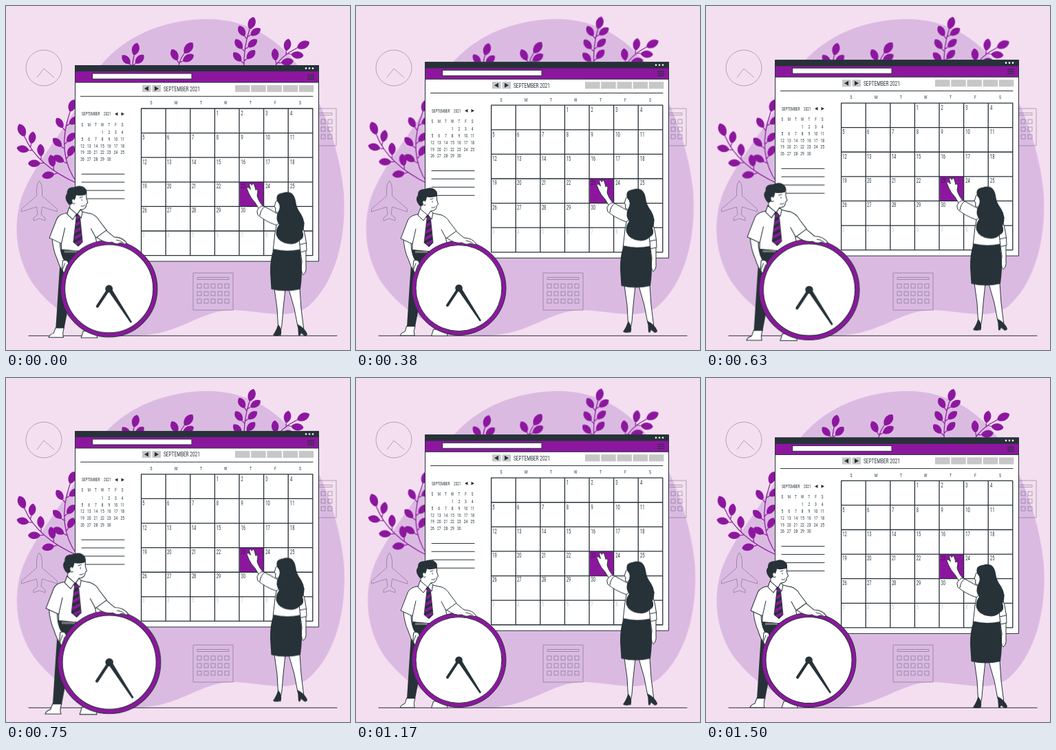
Write an HTML page that moves like this. It is 500 by 500 pixels and loops after 1.54 s.

```html
<!DOCTYPE html>
<html lang="en">
<head>
<meta charset="utf-8">
<title>Calendar planning</title>
<style>
html, body { margin: 0; width: 100%; height: 100%; overflow: hidden; background: #f4dff1; }
svg { display: block; width: 100vw; height: 100vh; }
text { font-family: Roboto, "Liberation Sans", sans-serif; fill: #263238; }
.ink { fill: #263238; }
.violet { fill: #8c179e; }
.line { fill: none; stroke: #263238; stroke-linecap: round; stroke-linejoin: round; }
.skin { fill: #fff; stroke: #263238; stroke-width: 1; stroke-linejoin: round; stroke-linecap: round; }
.faint { fill: none; stroke: #263238; stroke-width: .9; opacity: .38; }
.stem { fill: none; stroke: #8c179e; stroke-width: 1.2; }
.float { animation: float 1.54s linear infinite; }
.beat { transform-origin: 143px 374px; animation: beat 1.54s ease -.04s infinite; }
.sway { animation: sway .77s ease-in-out infinite; }
.drift { animation: drift 1.54s ease-in-out infinite; }
@keyframes float {
  0%, 100% { transform: translateY(-.4px); }
  48% { transform: translateY(-9.7px); }
  98% { transform: translateY(0); }
}
@keyframes beat {
  0%, 27.3%, 37.7%, 64.9%, 100% { transform: scale(1); }
  13.6%, 51.3% { transform: scale(1.09); }
}
@keyframes sway {
  0%, 100% { transform: rotate(0deg); }
  50% { transform: rotate(var(--a)); }
}
@keyframes drift {
  0%, 100% { transform: translateX(0); }
  25% { transform: translateX(-.8px); }
  75% { transform: translateX(1.6px); }
}
</style>
</head>
<body>
<svg viewBox="0 0 500 500">
  <defs>
    <path id="leaf" d="M0 0C.25-.38.8-.38 1 0C.8.38.25.38 0 0Z"/>
    <pattern id="stripes" width="8" height="8" patternUnits="userSpaceOnUse" patternTransform="rotate(-28)">
      <path class="ink" d="M0 0H8V8H0Z"/><path class="violet" d="M0 0H8V4H0Z"/>
    </pattern>
    <g id="planner" class="faint">
      <path d="M272 388H330V442H272ZM278 394.500H324V397.500H278Z"/>
      <g id="boxes"></g>
    </g>
  </defs>

  <path class="drift" fill="#dbbae2" d="M290 19C350 18 400 48 432 98C464 148 486 215 491 272C495 340 478 402 440 436C412 458 375 443 330 442C280 442 255 478 190 479C125 481 68 445 38 402C14 365 10 318 22 280C40 228 88 180 110 132C140 62 205 21 290 19Z"/>

  <g class="faint">
    <circle cx="55" cy="90" r="26"/>
    <path d="M45 104L55 91L70 104"/>
    <path d="M48.500 254Q52.500 258 52.500 266V276L74.500 295V299L52.500 292L51 303L57 308V312L48.500 309L40 312V308L46 303L44.500 292L22.500 299V295L44.500 276V266Q44.500 258 48.500 254Z"/>
  </g>
  <use href="#planner"/>
  <use href="#planner" x="150" y="-239"/>

  <g id="plants"></g>
  <path class="line" d="M33 479.300H481"/>

  <g class="float">
    <path fill="#fff" stroke="#263238" d="M100.500 87H454.500V371.500H100.500Z"/>
    <path class="violet" stroke="#263238" d="M100.500 95H454.500V111.500H100.500Z"/>
    <path class="ink" d="M100 86.500H455V95.500H100Z"/>
    <g fill="#fff"><circle cx="436" cy="91" r="1.300"/><circle cx="441" cy="91" r="1.300"/><circle cx="446" cy="91" r="1.300"/></g>
    <path class="skin" d="M126 98.500H270V106.500H126Z"/>
    <path class="line" stroke-width="1.200" d="M438.500 100.500H447.500M438.500 103.500H447.500M438.500 106.500H447.500"/>
    <path class="line" d="M108.500 131.700H446M110 244.700H172M110 256.500H172M110 268.500H172M110 280.500H172"/>
    <path fill="#c7c7c7" d="M198 115.500H210.500V125.500H198ZM212.500 115.500H225V125.500H212.500Z"/>
    <path class="ink" d="M207 117V124L201 120.500ZM216 117V124L222 120.500ZM162.500 155V160L158 157.500ZM167.500 155V160L172 157.500Z"/>
    <g id="tabs" fill="#c7c7c7"></g>
    <path class="violet" d="M339.500 256H375V291.500H339.500Z"/>
    <path id="grid" class="line" stroke-width="1.300"/>
    <g id="labels"></g>

    <g id="woman">
      <path class="skin" d="M390 411L394 440L395.500 466L393 475H399L401 464L403 440L406 412ZM411 412L419 440L424 466L429 475L433 472L429 440L427 411Z"/>
      <path class="ink" d="M395.500 463Q402 470 399.500 479.500H397Q391 481 388 478.500Q393 472 395.500 463ZM424 463Q434 468 438 477Q438 480 434 480L429 476L427.500 479.500H425Z"/>
      <path class="skin" d="M428 355L436 355V379Q437 387 432 391Q428 388 430 372Z"/>
      <path class="skin" d="M371 301L362 286Q356 280 353 273L350 265.500Q352 262 355.500 267L353.500 260Q355 256.500 357.500 261L358 259Q360 257 361.500 262L363 268Q366 265 366 270L365 276Q367 285 376 294Z"/>
      <path class="skin" d="M396 304L391 330L388 357H428L428 345L433 315L424 305Z"/>
      <path class="skin" d="M365 298Q368 291 374 291L394 302Q400 306 399 314L393 319Q376 313 366 304Z"/>
      <path class="line" d="M369 305Q370 296 376 292"/>
      <path class="skin" d="M423 308Q433 316 436.500 345L437 356L428 358L426 338Z"/>
      <path class="line" d="M427 347L436.500 345"/>
      <path class="skin" d="M398 281L392.500 284L390 292L392 294L391.500 299L397 302H404Z"/>
      <path class="ink" d="M394 284Q391 273 402 272Q418 267 421 284Q422 294 429 303Q437 316 431 328Q435 337 427 341Q421 348 410 346Q397 344 393 334Q391 326 397 318Q391 310 395 301Q401 291 394 284Z"/>
      <path class="ink" d="M389 353.500Q383.500 368 384 388L385.500 412Q406 417 428 412Q431 390 429.500 374L427.500 354Q407 358 389 353.500Z"/>
    </g>
  </g>

  <g class="beat">
    <path class="skin" d="M74 465H86Q83 473 85 479H64Q65 475 71 473ZM113 470H131L133 479.500H110Z"/>
    <path class="ink" d="M81.500 353H114L120 420L91 440L86 466H74L78 404Z"/>
    <path class="skin" d="M90 303L108 300L124 304L132 345L122 358L82 354.500L82 335Z"/>
    <path fill="#777" d="M86 356H104V359H86Z"/>
    <path class="skin" d="M69 339L80 344Q80 358 85 368Q92 372 92 379L86 388Q79 379 76 368Q70 355 69 339Z"/>
    <path class="skin" d="M91 302.500Q79 304 75.500 311L65 338L82 346L87 324"/>
    <path class="skin" d="M94 281V303L103 307L109 298Q117 298 117.500 290L119.500 288L117.500 282V273H98Z"/>
    <path class="ink" d="M92 290Q85 281 90 275Q89 266 100 266Q110 262 115 267Q120 271 116.500 277Q108 279 103 277.500Q102 284 98 288Q96 293 92 290Z"/>
    <path class="skin" d="M100 283Q96 282 97 287Q98 291 101 289"/>
    <path class="line" stroke-width=".9" d="M108 281L112 280M111 283.500V285M110 293Q113 294 115 292"/>
    <path fill="url(#stripes)" stroke="#263238" stroke-width=".8" d="M102 304H108L108.500 309L112 344L106 350L99 344L103 309Z"/>
    <path class="skin" d="M93 295L90 304L98 312L103.500 304ZM109 298L112 301L110 310L105 304Z"/>

    <circle class="violet" cx="149.500" cy="410" r="68.500" stroke="#263238"/>
    <circle class="skin" cx="149.500" cy="410" r="62.500"/>
    <path class="line" stroke-width="4" stroke-linecap="butt" d="M149.500 410L133 435"/>
    <path class="ink" d="M147 411L152 408L182 457L180 458.500Z"/>
    <circle class="ink" cx="149.500" cy="410" r="5.300"/>

    <path class="skin" d="M132 337L145 327L157 337Q169 337 175 346L171 347L166 345Q160 348 154 344Q143 346 132 337Z"/>
    <path class="line" stroke-width=".9" d="M160 341Q166 341 171 346"/>
    <path class="skin" d="M122 303Q132 306 136 314L146 327L131 338L124 325"/>
    <path class="skin" d="M84 370Q91 368 92 374L88 384L85 388L83 381Z"/>
    <path class="line" stroke-width=".9" d="M87 374L84 382M90 376L87 384"/>
  </g>
</svg>
<script>
const $ = id => document.getElementById(id);
const range = n => [...Array(n).keys()];

// One narrow lettering style, shared by all labels.
const label = (str, x, y, size, fill = '#263238', anchor = 'start') =>
  `<text transform="translate(${x} ${y + size * 0.355}) scale(.67 1)" font-size="${size}" text-anchor="${anchor}" style="fill:${fill}">${str}</text>`;

function leaf(x, y, deg, len) {
  return `<use href="#leaf" class="violet" transform="translate(${x} ${y}) rotate(${deg}) scale(${len})"/>`;
}

// A quadratic stem with pairs of leaves and one at the tip.
function branch([ax, ay], [bx, by], [cx, cy], joints, len) {
  const at = t => {
    const u = 1 - t;
    return {
      x: u * u * ax + 2 * u * t * bx + t * t * cx,
      y: u * u * ay + 2 * u * t * by + t * t * cy,
      deg: Math.atan2(u * (by - ay) + t * (cy - by), u * (bx - ax) + t * (cx - bx)) * 180 / Math.PI
    };
  };
  let out = `<path class="stem" d="M${ax} ${ay}Q${bx} ${by} ${cx} ${cy}"/>`;
  for (const t of joints) {
    for (const side of [-1, 1]) {
      const p = at(t + side * 0.03), deg = p.deg + side * 50, r = deg * Math.PI / 180;
      const x = p.x + 5 * Math.cos(r), y = p.y + 5 * Math.sin(r);
      out += `<path class="stem" d="M${p.x} ${p.y}L${x} ${y}"/>` + leaf(x, y, deg - side * 8, len * 0.92);
    }
  }
  const tip = at(1);
  return out + leaf(tip.x, tip.y, tip.deg, len);
}

const plant = (x, y, deg, ...parts) =>
  `<g class="sway" style="transform-origin:${x}px ${y}px;--a:${deg}deg">${parts.join('')}</g>`;

$('plants').innerHTML =
  plant(102, 258, 2.2,
    branch([104, 258], [45, 232], [27, 190], [0.3, 0.53, 0.78], 20),
    branch([104, 258], [72, 215], [93, 154], [0.35, 0.56, 0.8], 19)) +
  plant(184, 92, 4, branch([184, 92], [184, 80], [186, 72], [0.2], 19)) +
  plant(250, 92, -2, branch([250, 92], [252, 78], [259, 69], [0.35], 20)) +
  plant(346, 92, -2.5, branch([346, 92], [345, 60], [354, 34], [0.16, 0.45, 0.77], 19)) +
  plant(388, 92, -2, branch([388, 92], [400, 72], [423, 61], [0.22, 0.65], 20));

$('boxes').innerHTML = range(15).map(i =>
  `<rect x="${278 + i % 5 * 10}" y="${404 + Math.floor(i / 5) * 11}" width="6" height="6"/>`).join('');
$('tabs').innerHTML = range(5).map(i =>
  `<rect x="${333 + i * 23.2}" y="115.500" width="21.500" height="10"/>`).join('');

const left = 196.6, top0 = 149.4, step = 35.6;
$('grid').setAttribute('d',
  range(8).map(i => `M${left + i * step} ${top0}v${6 * step}`).join('') +
  range(7).map(i => `M${left} ${top0 + i * step}h${7 * step}`).join(''));

let labels = label('SEPTEMBER 2021', 229, 120.6, 9.7) +
  label('SEPTEMBER', 110, 157.4, 7) + label('2021', 142, 157.4, 7);
[...'SMTWTFS'].forEach((day, c) => {
  labels += label(day, 211 + c * 36.1, 141, 7.6, undefined, 'middle');
  labels += label(day, 111 + c * 9.7, 172.5, 7, undefined, 'middle');
});
for (const i of range(42)) {
  const c = i % 7, r = Math.floor(i / 7), day = i - 2;
  if (day < 1) continue;
  const next = day > 30;
  const name = day === 31 ? 'OCT 1' : next ? day - 30 : day;
  const tint = next ? '#c4c4c4' : day === 23 ? '#42104f' : undefined;
  labels += label(name, 198.3 + c * 35.8, 156.5 + r * 35.3, 8.5, tint);
  if (!next) labels += label(day, 111 + c * 9.7, 183.7 + r * 9.8, 7.4, undefined, 'middle');
}
$('labels').innerHTML = labels;
</script>
</body>
</html>
```
